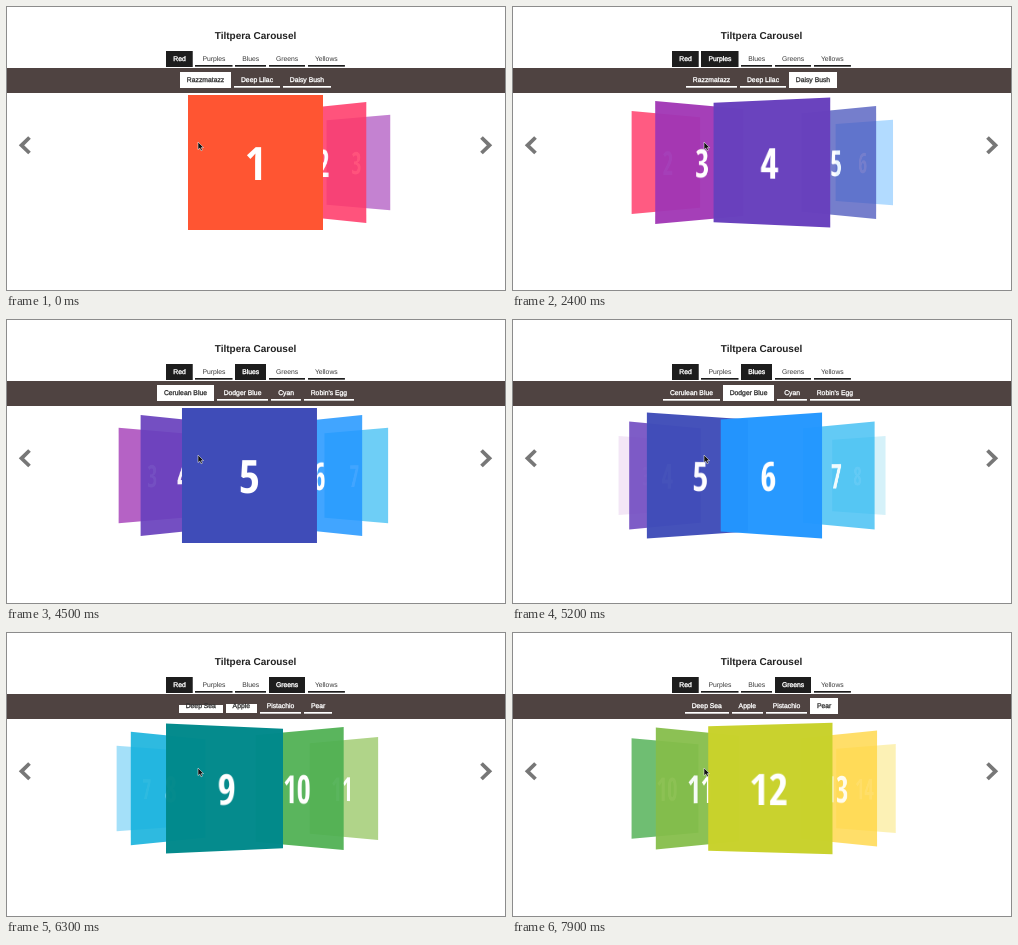
Animation, 500 px wide and 285 px high, one loop 8000 ms. Source, as an HTML page:

```html
<!DOCTYPE html>
<html lang="en">
<head>
<meta charset="utf-8">
<title>Carousel</title>
<style>
  html, body { margin: 0; width: 100%; height: 100%; overflow: hidden; background: #fff; }
  #stage {
    position: relative; width: 500px; height: 285px; overflow: hidden; background: #fff;
    font-family: "Liberation Sans", Arial, sans-serif; text-rendering: geometricPrecision;
  }
  #stage::after {
    content: ""; position: absolute; inset: 0; border: 1px solid #8c8c8c; z-index: 5;
  }
  h1 {
    position: absolute; top: 25px; left: 0; width: 499px; margin: 0;
    font: bold 10px/12px "Liberation Sans", Arial, sans-serif; text-align: center; color: #222;
  }
  nav {
    position: absolute; left: 0; width: 499px; height: 16px;
    display: flex; justify-content: center; gap: 2.7px;
    font-size: 6.8px; line-height: 17px; white-space: nowrap;
  }
  nav span {
    padding: 0 7px;
    background: linear-gradient(var(--ink), var(--ink)) bottom / 100% var(--h, 1.7px) no-repeat;
  }
  #main { top: 44.5px; --ink: #1d1d1d; color: #3a3a3a; }
  #main .on { --h: 16px; color: #fff; -webkit-text-stroke: .35px #fff; }
  #strip { position: absolute; top: 62px; left: 0; width: 500px; height: 25px; background: #4f4341; }
  #strip nav { top: 3.5px; --ink: #fff; -webkit-text-stroke: .3px currentColor; }
  #cards { position: absolute; inset: 0; z-index: 1; }
  .card {
    position: absolute; left: 182px; top: 89px; width: 135px; height: 135px;
    color: #fff; text-align: center; line-height: 136px; font-size: 46px; font-weight: 600;
    font-family: "Open Sans Condensed", "Liberation Sans Narrow", "Open Sans", "Noto Sans", sans-serif;
    font-stretch: 62.5%;
  }
  svg { position: absolute; inset: 0; z-index: 3; }
</style>
</head>
<body>
<div id="stage">
  <h1>Tiltpera Carousel</h1>
  <nav id="main"></nav>
  <div id="strip"></div>
  <div id="cards"></div>
  <svg width="500" height="285" viewBox="0 0 500 285">
    <g fill="none" stroke="#777" stroke-width="3.8">
      <path d="M23.5 131.5L15.5 139.3L23.5 147"/>
      <path d="M475.5 131.5L483.5 139.3L475.5 147"/>
    </g>
    <path d="M192 136V143.6L193.8 142.1L195 144.8L196.4 144.2L195.3 141.6H197.6Z"
          fill="#111" stroke="#fff" stroke-width=".5"/>
  </svg>
</div>
<script>
const LOOP = 8000;
const COLORS = ['#ff5532', '#ff3666', '#a034b4', '#673fbd', '#3f4cb8', '#2196ff', '#14aff0',
  '#10b0dc', '#00898b', '#4caf50', '#84bd48', '#c8d22a', '#ffd43c', '#f7de55'];

// one entry per step to the next card: start, duration, time its label lights up
const MOVES = [
  [950, 330, -1000], [1280, 570, 1560], [1850, 1089, 2000], [3340, 956, 3700],
  [4560, 1660, 4900], [5200, 600, 5400], [5450, 600, 5650], [5700, 550, 5880],
  [6165, 500, 6220], [6600, 860, 6700], [7640, 448, 7680]
];
const GROUPS = [
  { tab: 1, first: 2, names: ['Razzmatazz', 'Deep Lilac', 'Daisy Bush'] },
  { tab: 2, first: 5, names: ['Cerulean Blue', 'Dodger Blue', 'Cyan', "Robin's Egg"] },
  { tab: 3, first: 9, names: ['Deep Sea', 'Apple', 'Pistachio', 'Pear'] }
];

// keyed by distance from the front card
const SCALE = [[1, .83], [2, .665], [3, .45]];
const REACH = [[1, 68], [2, 101], [3, 110]];
const ALPHA_PAST = [[0, 1], [.5, .97], [1, .92], [2, .78], [2.6, 0]];
const ALPHA_NEXT = [[0, 1], [.5, .97], [1, .86], [1.4, .68], [2, .62], [2.7, 0]];
// sideways drift of the whole list over time
const DRIFT = [[1000, 0], [1500, 13], [2000, 0], [2400, -7], [3000, 0], [3400, 0],
  [3600, 7], [4300, 0], [5200, -27], [6300, -14], [6900, 0]];

const clamp = (v, a = 0, b = 1) => Math.min(b, Math.max(a, v));

function track(keys, at) {
  if (at <= keys[0][0]) return keys[0][1];
  for (let i = 1; i < keys.length; i++) {
    const [a, va] = keys[i - 1], [b, vb] = keys[i];
    if (at <= b) return va + (vb - va) * (at - a) / (b - a);
  }
  return keys[keys.length - 1][1];
}

function ease(u) {
  u = clamp(u);
  return 1 - (1 - u) ** 3 * (1 + 3 * u);
}

function add(parent, tag, text = '') {
  const el = document.createElement(tag);
  el.textContent = text;
  return parent.appendChild(el);
}

const byId = id => document.getElementById(id);
const tabs = ['Red', 'Purples', 'Blues', 'Greens', 'Yellows'].map(n => add(byId('main'), 'span', n));
tabs[0].className = 'on';

for (const g of GROUPS) {
  g.nav = add(byId('strip'), 'nav');
  g.labels = g.names.map(n => add(g.nav, 'span', n));
}

const cards = COLORS.map((color, i) => {
  const el = add(byId('cards'), 'div', i + 1);
  el.className = 'card';
  el.style.background = color;
  return el;
});

const litAt = card => MOVES[card - 2] ? MOVES[card - 2][2] : Infinity;

function drawCards(t) {
  const pos = MOVES.reduce((p, [start, dur]) => p + ease((t - start) / dur), 1);
  const drift = track(DRIFT, t);
  cards.forEach((el, i) => {
    const d = i + 1 - pos, far = Math.abs(d), side = Math.sign(d);
    el.style.display = far < 3 ? '' : 'none';
    if (far >= 3) return;
    const turn = Math.sin(Math.min(far, 1) * Math.PI / 2);
    const size = far < 1 ? 1 - .17 * turn : track(SCALE, far);
    const reach = far < 1 ? 68 * far * far * (3 - 2 * far) : track(REACH, far);
    const x = side * reach + drift * clamp(1.33 - .65 * far, .35);
    el.style.transform =
      `translateX(${x}px) perspective(535px) rotateY(${-45 * side * turn}deg) scale(${size})`;
    el.style.opacity = track(d < 0 ? ALPHA_PAST : ALPHA_NEXT, far);
    el.style.zIndex = 100 - Math.round(far * 20);
  });
}

function drawLabels(t) {
  for (const g of GROUPS) {
    const next = g.first + g.names.length;
    const shown = t >= litAt(g.first) && t < litAt(next);
    g.nav.style.display = shown ? '' : 'none';
    tabs[g.tab].className = shown && t >= 980 ? 'on' : '';
    g.labels.forEach((el, i) => {
      const card = g.first + i;
      const grow = i ? clamp((t - litAt(card)) / 150) : 1;
      const lit = grow - clamp((t - litAt(card + 1)) / 150);
      el.style.setProperty('--h', 1.7 + 14.3 * lit + 'px');
      el.style.color = lit > .4 ? '#333' : '#fff';
    });
  }
}

function frame() {
  const t = performance.now() % LOOP;
  drawCards(t);
  drawLabels(t);
  requestAnimationFrame(frame);
}
frame();
</script>
</body>
</html>
```
